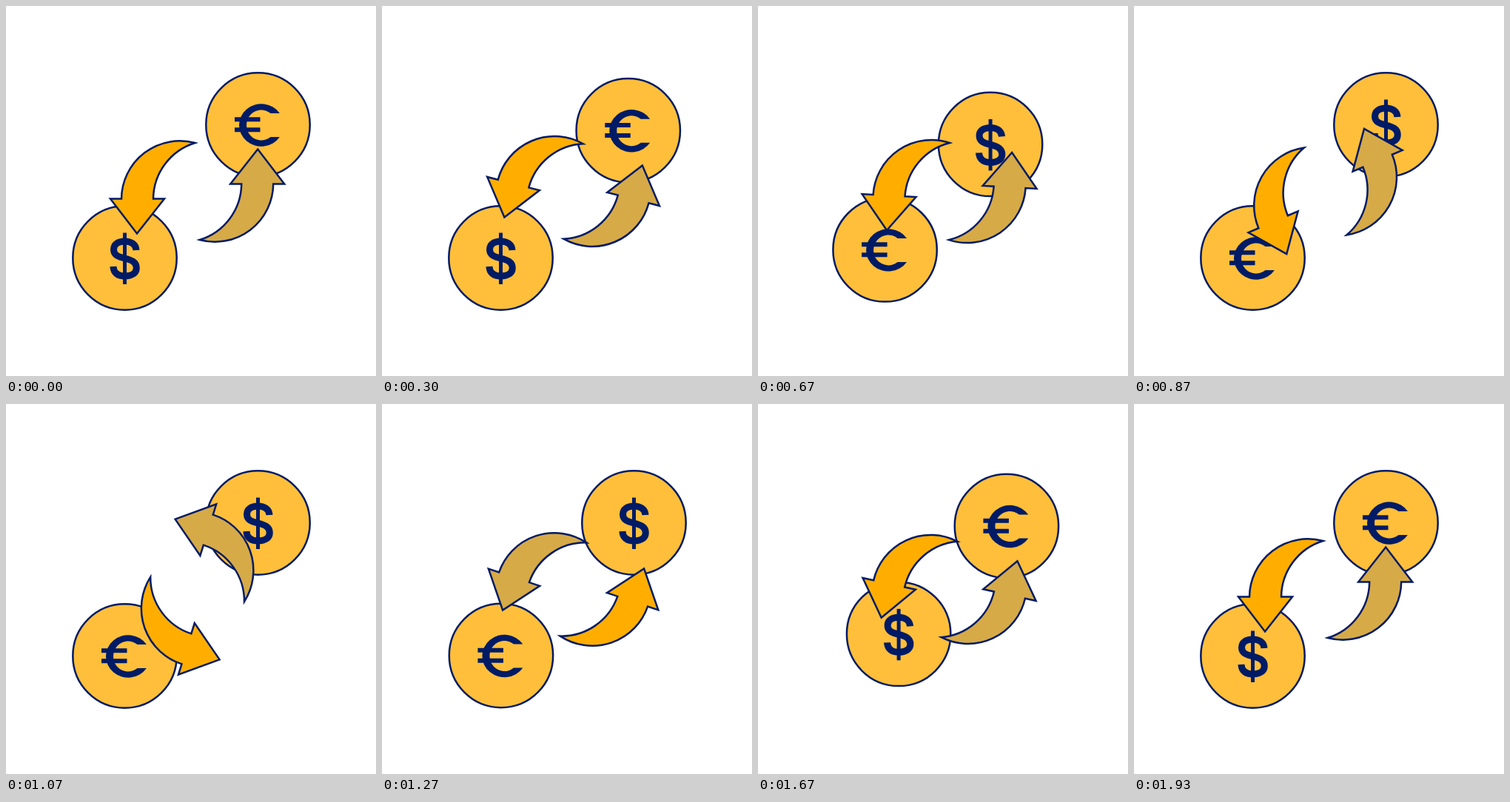
These frames come from a looping animation (500x500 px, 2000 ms). An HTML page:

```html
<!DOCTYPE html>
<html lang="en">
<head>
<meta charset="utf-8">
<title>Currency exchange</title>
<style>
html, body { margin: 0; width: 100%; height: 100%; overflow: hidden; background: #fff; }
svg { display: block; width: 100vw; height: 100vh; }
.line { fill: none; stroke: #001b66; }
.body { stroke: #001b66; stroke-width: 2.5; }
</style>
</head>
<body>
<svg viewBox="0 0 500 500">
  <defs>
    <circle id="disc" class="body" r="70.2" fill="#ffbf3a"/>
    <path id="arrow" class="body" d="M177 307.5 L141 260.5 H156 A79 79 0 0 1 255.500 185 A80 80 0 0 0 199 260.5 H214 Z"/>
  </defs>
  <g id="dollar">
    <use href="#disc"/>
    <path class="line" stroke-width="9" d="M15.5 -10.5 C15 -18.5 8.5 -22.5 0 -22.5 C-9 -22.5 -15 -18.5 -15 -11.5 C-15 -3.5 -8 -1.5 0 .5 C8 2.5 15.8 5 15.8 13.5 C15.8 20.5 9.5 24.5 0 24.5 C-9.5 24.5 -15.2 20 -15.6 11.5"/>
    <path class="line" stroke-width="5" d="M0 -34 V35.5"/>
  </g>
  <g id="euro">
    <use href="#disc"/>
    <path fill="#001b66" d="M29.400 -15.5 A30 28.700 0 1 0 29.400 16.5 H17 A20 20.5 0 1 1 17 -15.5 Z"/>
    <path class="line" stroke-width="6" d="M-31.5 -7.200 H3 M-31.5 6.800 H3"/>
  </g>
  <g id="arrows">
    <use href="#arrow" fill="#d6aa47" transform="rotate(180 258.6 250.5)"/>
    <use href="#arrow" fill="#ffae00"/>
  </g>
</svg>
<script>
const LOOP = 2000, FPS = 30;
const [dollar, euro, arrows] = ['dollar', 'euro', 'arrows'].map(id => document.getElementById(id));

// Arrow turn: [step, degrees, degrees per step]
const turn = [
  [0, 0, 2.3], [9, 14.4, 0.6], [20, 3.1, -2.4], [26, -23.3, -6.8],
  [38, -161.5, -20], [44, -284.7, -17], [58, -360, 0]
];

function angle(n) {
  const i = turn.findIndex(k => k[0] > n);
  if (i < 0) return 0;
  const [a, p, v] = turn[i - 1], [b, q, w] = turn[i];
  const d = b - a, u = (n - a) / d, r = 1 - u;
  return r * r * ((1 + 2 * u) * p + u * d * v) + u * u * ((3 - 2 * u) * q - r * d * w);
}

function ease(n, start, length) {
  const u = Math.min(1, Math.max(0, (n - start) / length));
  return u * u * (3 - 2 * u);
}

// p runs from 0 (lower left) to 1 (upper right)
function place(coin, p) {
  coin.setAttribute('transform', `translate(${160.5 + 180 * p} ${340.5 - 180 * p})`);
}

function draw() {
  const n = Math.floor(performance.now() % LOOP * FPS / 1000);
  place(euro, 1 - ease(n, 7.1, 15.2) + ease(n, 37.6, 13.7));
  place(dollar, ease(n, 9, 14.5) - ease(n, 39.9, 13.6));
  arrows.setAttribute('transform', `rotate(${angle(n)} 258.6 250.5)`);
  requestAnimationFrame(draw);
}
draw();
</script>
</body>
</html>
```
